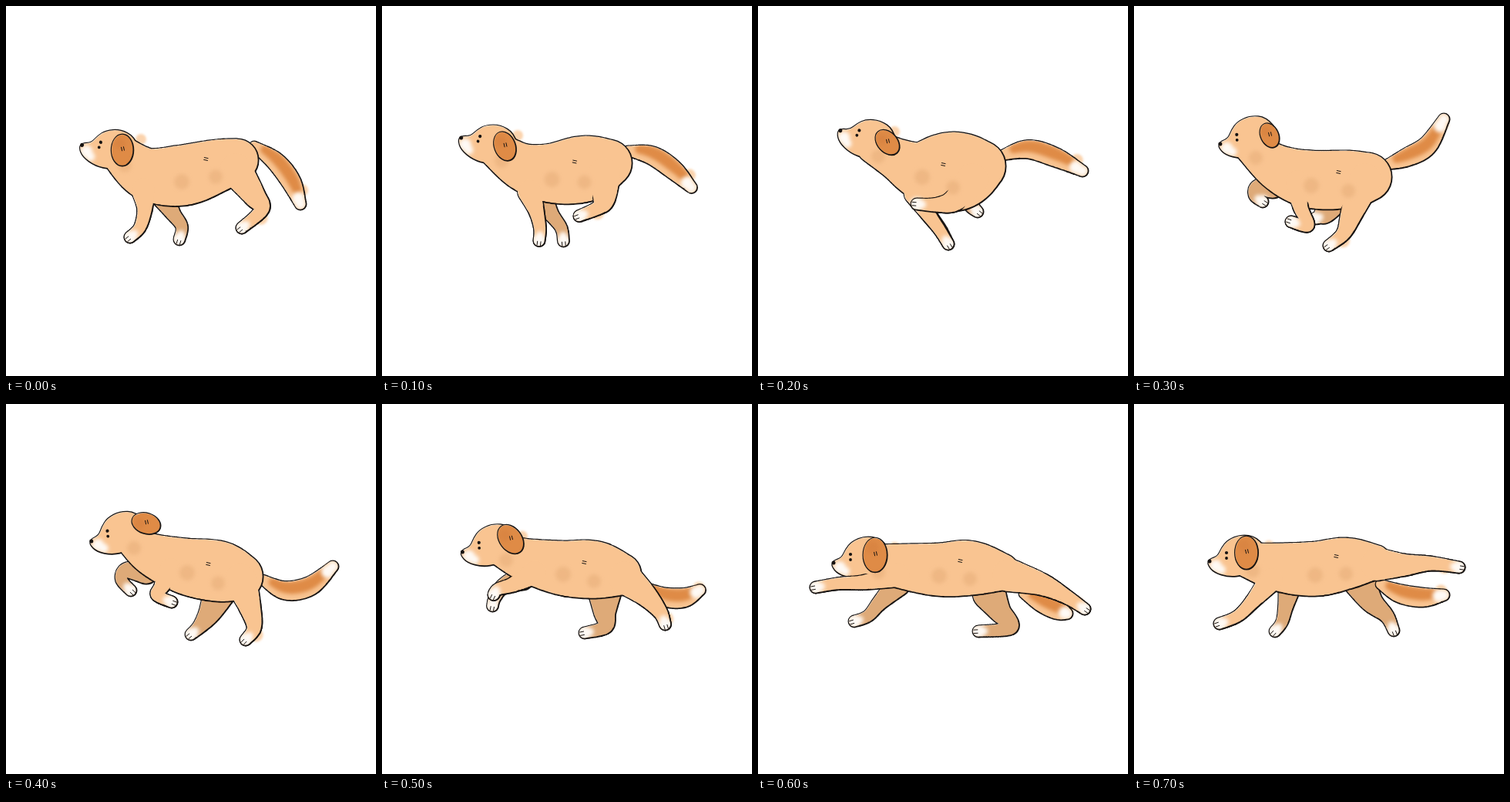
Write an HTML page with a canvas that moves like this. It is 480x480 px and loops after 800 ms.

```html
<!DOCTYPE html>
<html lang="en">
<head>
<meta charset="utf-8">
<title>Running dog</title>
<style>
html, body { margin: 0; width: 100%; height: 100%; overflow: hidden; background: #fff; }
canvas { position: absolute; left: 0; top: 0; }
</style>
</head>
<body>
<canvas id="paint" width="480" height="480"></canvas>
<canvas id="ink" width="480" height="480"></canvas>
<script>
// head: nose x, y, turn; ear: x, y, turn, scale; torso: x, y, radius; limbs and tail: joints x, y
const land = {
  head: [97, 182, 18], ear: [151, 187, 0, 0.95],
  torso: [148, 192, 24, 183, 218, 33, 228, 220, 39, 272, 208, 34, 300, 200, 27],
  front: [178, 238, 180, 263, 174, 287, 161, 300], farFront: [205, 248, 216, 268, 228, 286, 225, 303],
  hind: [298, 212, 322, 246, 332, 264, 306, 288], farHind: [285, 208, 287, 210, 286, 212, 285, 214],
  tail: [322, 182, 350, 202, 370, 228, 382, 257]
};
const gather = {
  head: [105, 163, 26], ear: [168, 177, -42, 0.85],
  torso: [150, 182, 22, 182, 200, 27, 213, 214, 37, 253, 215, 51, 288, 208, 33],
  front: [205, 243, 221, 270, 236, 291, 247, 309], farFront: [208, 246, 222, 270, 237, 290, 246, 307],
  hind: [278, 225, 255, 252, 232, 258, 206, 257], farHind: [270, 232, 272, 245, 278, 260, 285, 267],
  tail: [316, 194, 350, 186, 385, 196, 421, 214]
};
const tuck = {
  head: [111, 181, -3], ear: [176, 168, -25, 0.76],
  torso: [152, 185, 20, 190, 212, 30, 230, 225, 37, 278, 225, 37, 303, 222, 31],
  front: [212, 228, 216, 260, 226, 285, 204, 280], farFront: [180, 234, 160, 236, 157, 246, 167, 254],
  hind: [300, 225, 283, 268, 272, 295, 253, 311], farHind: [270, 238, 250, 266, 242, 273, 234, 276],
  tail: [328, 206, 355, 196, 381, 181, 402, 147]
};
const rise = {
  head: [110, 180, -6], ear: [182, 155, -72, 0.88],
  torso: [160, 176, 18, 190, 196, 27, 235, 211, 36, 275, 217, 39, 303, 224, 30],
  front: [214, 215, 202, 237, 196, 248, 215, 257], farFront: [182, 218, 156, 216, 150, 228, 162, 242],
  hind: [304, 228, 316, 262, 322, 290, 311, 306], farHind: [278, 242, 265, 270, 252, 288, 240, 299],
  tail: [333, 228, 362, 242, 395, 236, 424, 211]
};
const stretch = {
  head: [97, 208, 0], ear: [152, 196, 0, 1.04],
  torso: [150, 205, 22, 190, 211, 29, 235, 215, 34, 275, 213, 35, 315, 218, 24],
  front: [182, 222, 140, 231, 105, 233, 75, 238], farFront: [182, 234, 158, 258, 143, 275, 125, 282],
  hind: [325, 222, 368, 234, 400, 250, 424, 266], farHind: [300, 246, 313, 268, 328, 290, 286, 295],
  tail: [345, 246, 368, 258, 388, 267, 401, 272]
};
const glide = {
  head: [97, 206, 0], ear: [146, 193, 0, 1],
  torso: [148, 203, 22, 190, 212, 31, 235, 214, 35, 275, 207, 33, 312, 205, 22],
  front: [178, 228, 155, 255, 135, 275, 111, 285], farFront: [203, 233, 197, 262, 192, 283, 183, 295],
  hind: [315, 208, 350, 209, 385, 207, 422, 212], farHind: [293, 230, 308, 256, 328, 275, 337, 294],
  tail: [320, 234, 345, 246, 375, 251, 402, 248]
};
const midway = (a, b) => Object.fromEntries(
  Object.keys(a).map(k => [k, a[k].map((v, i) => (v + b[k][i]) / 2)]));
const poses = [land, midway(land, gather), gather, tuck, rise, midway(rise, stretch), stretch, glide];

const skull = [-1, 2, 1, -4, 12, -8, 17, -19, 25, -29, 42, -36, 62, -33, 78, -12, 66, 8, 46, 16, 26, 18, 7, 12];
const frontWidth = [15, 9.5, 7.5, 7], hindWidth = [21, 14, 9, 7], tailWidth = [6, 11.5, 12, 7];
const coat = "#f9c491", shade = "#deaa78", orange = "#df8b46", white = "#fffaf5", black = "#171311";
const [paint, ink] = ["paint", "ink"].map(id => document.getElementById(id).getContext("2d"));

const chunk = (a, n) => Array.from({ length: a.length / n }, (_, i) => a.slice(i * n, i * n + n));
const withWidth = (joints, width) => chunk(joints, 2).map((p, i) => [...p, width[i]]);

function spline(a, b, c, d, t) {
  return b + t / 2 * (c - a + t * (2 * a - 5 * b + 4 * c - d + t * (3 * (b - c) + d - a)));
}

// Circles strung closely along a smooth line through the joints.
function string(joints) {
  const out = [], last = joints.length - 1;
  const at = i => joints[Math.max(0, Math.min(last, i))];
  for (let i = 0; i < last; i++)
    for (let t = 0; t < 1; t += 1 / 16)
      out.push(at(i).map((_, k) => spline(at(i - 1)[k], at(i)[k], at(i + 1)[k], at(i + 2)[k], t)));
  return [...out, joints[last]];
}

function circles(list) {
  const path = new Path2D();
  for (const [x, y, r] of list) {
    path.moveTo(x + r, y);
    path.arc(x, y, r, 0, 7);
  }
  return path;
}

function placed(path, x, y, turn, scale = 1) {
  const out = new Path2D();
  out.addPath(path, new DOMMatrix().translate(x, y).rotate(turn).scale(scale));
  return out;
}

function closed(points) {
  const p = chunk(points, 2), n = p.length, path = new Path2D();
  for (let i = 0; i < n; i++) {
    const [x, y] = p[i], [u, v] = p[(i + 1) % n];
    path[i ? "quadraticCurveTo" : "moveTo"](...(i ? [x, y] : [(x + u) / 2, (y + v) / 2]), (x + u) / 2, (y + v) / 2);
  }
  path.quadraticCurveTo(...p[0], (p[0][0] + p[1][0]) / 2, (p[0][1] + p[1][1]) / 2);
  return path;
}

function wash(color, path, mode = "source-atop", blur = 2.5) {
  paint.globalCompositeOperation = mode;
  paint.filter = blur ? `blur(${blur}px)` : "none";
  paint.fillStyle = color;
  paint.fill(path);
}

// Strokes the shapes, then clears their insides, so only the joint contour stays.
function contour(strokes, insides = strokes) {
  ink.globalCompositeOperation = "source-over";
  ink.lineWidth = 3;
  strokes.forEach(p => ink.stroke(p));
  ink.globalCompositeOperation = "destination-out";
  ink.save();
  ink.translate(-0.3, -0.3);
  insides.forEach(p => ink.fill(p));
  ink.restore();
  ink.globalCompositeOperation = "source-over";
}

function layer(color, paths) {
  paths.forEach(p => wash(color, p, "source-over", 0));
  contour(paths);
}

function tick2(x, y, dx, dy, gap) {
  ink.lineWidth = 1;
  for (const g of [-gap, gap]) {
    ink.beginPath();
    ink.moveTo(x - dy * g, y + dx * g);
    ink.lineTo(x - dy * g + dx * 5, y + dx * g + dy * 5);
    ink.stroke();
  }
}

function paw(limb) {
  const [x, y, r] = limb.at(-1), [u, v] = limb.at(-9);
  const len = Math.hypot(x - u, y - v) || 1, dx = (x - u) / len, dy = (y - v) / len;
  wash(white, circles([[x, y, r + 2], [x - dx * 7, y - dy * 7, r - 2]]));
  if (len > 3) tick2(x + dx, y + dy, dx, dy, 2.2);
}

function draw(pose) {
  for (const c of [paint, ink]) c.clearRect(0, 0, 480, 480);
  ink.strokeStyle = ink.fillStyle = black;
  ink.lineCap = ink.lineJoin = "round";

  const limb = (name, width) => string(withWidth(pose[name], width));
  const front = limb("front", frontWidth), hind = limb("hind", hindWidth);
  const far = [limb("farFront", frontWidth), limb("farHind", hindWidth)];
  const tail = limb("tail", tailWidth);
  const torso = chunk(pose.torso, 3);
  const head = placed(closed(skull), ...pose.head);

  for (const f of far) {
    layer(shade, [circles(f)]);
    paw(f);
  }

  layer(coat, [circles(tail)]);
  wash(orange, circles(tail.slice(8, 40).map(([x, y, r]) => [x + 1, y - 4, r * 0.65])));
  wash(white, circles([tail.at(-1), tail.at(-6)]));

  layer(coat, [circles(string(torso)), head, circles(front), circles(hind)]);
  for (const near of [front, hind]) {
    contour([circles(near.slice(16))], [circles(near)]);
    paw(near);
  }
  const [[nx, ny, nr], , [mx, my], [bx, by, br]] = torso;
  wash("#dc9f6a55", circles([[nx + 6, ny + nr * 0.6, 9], [mx, my + 8, 10], [bx, by + br * 0.4, 9]]));
  wash(white, placed(circles([[9, 4, 8], [16, 9, 6]]), ...pose.head));

  const bean = new Path2D();
  bean.ellipse(0, 0, 14.5, 21, 0, 0, 7);
  const ear = placed(bean, ...pose.ear);
  wash(orange, ear, "source-over", 0);
  contour([ear]);
  wash("#cf793855", placed(circles([[-3, -9, 8]]), ...pose.ear));

  ink.fill(placed(circles([[23, -13, 2.1], [23, -6, 1.9], [1, -2, 2.5]]), ...pose.head));
  tick2(pose.ear[0], pose.ear[1] - 4, 0.2, 0.9, 1.6);
  tick2(bx - 15, by - 10, 0.95, 0.2, 1.5);

  const [tx, ty] = tail.at(-8), [hx, hy] = hind.at(-12);
  wash("#fbd3ad", circles([[tx + 6, ty - 7, 8], [hx + 5, hy + 3, 9], [nx + 27, ny - 19, 7]]), "destination-over", 1.5);
}

let shown = -1;
function play(now) {
  const i = Math.floor(now / 100) % poses.length;
  if (i != shown) draw(poses[shown = i]);
  requestAnimationFrame(play);
}
play(0);
</script>
</body>
</html>
```
